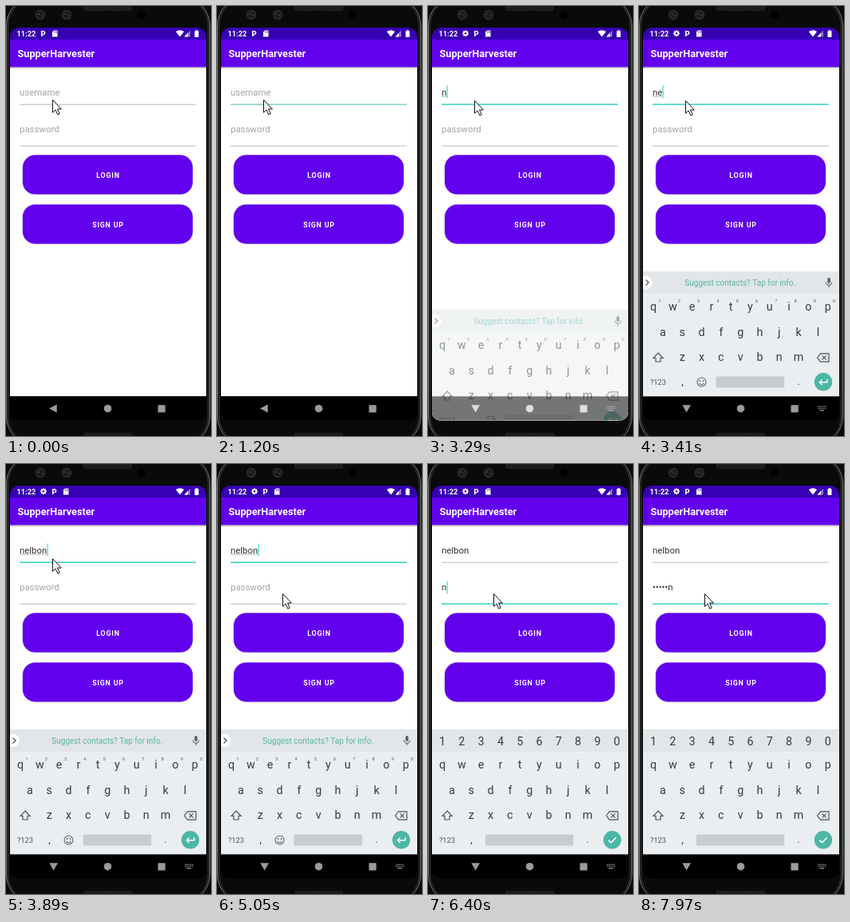
Write an HTML page with a canvas that moves like this. It is 257 by 538 pixels and loops after 8000 ms.

```html
<!DOCTYPE html>
<html lang="en">
<head>
<meta charset="utf-8">
<title>Login screen</title>
<style>
html, body { margin: 0; width: 100%; height: 100%; overflow: hidden; background: #0a0a0a; }
canvas { display: block; width: 257px; height: 538px; }
</style>
</head>
<body>
<canvas id="stage"></canvas>
<script>
const W = 257, H = 538, LOOP = 8000;
const TOOLBAR_END = 76.3, NAV_TOP = 488.4, SCREEN_END = 518.5;
const canvas = document.getElementById('stage');
const g = canvas.getContext('2d');
const dpr = window.devicePixelRatio || 1;
canvas.width = W * dpr;
canvas.height = H * dpr;

const PURPLE = '#6200ee', TEAL = '#40dccd', GREY = '#bababa', MINT = '#4db6a4', INK = '#343d42';
const NAME = 'nelbon';
const NAME_TIMES = [3040, 3410, 3530, 3650, 3770, 3890];
const PASS_TIMES = [6400, 6520, 6640, 6790, 7350, 7470];
const USER_CARET = [1320, 1740, 2250, 2780, 3040, 4420, 4930, 5170];
const PASS_CARET = [5290, 5780, 6280, 7970];

const passed = (times, t) => times.filter(x => t >= x).length;
const isOn = (toggles, t) => passed(toggles, t) % 2 === 1;
// Value of the last [time, value] pair reached.
const at = (steps, t) => steps.reduce((v, [time, next]) => t >= time ? next : v, steps[0][1]);

function rect(x, y, w, h, color) {
  g.fillStyle = color;
  g.fillRect(x, y, w, h);
}
function round(x, y, w, h, r, color) {
  g.beginPath();
  g.roundRect(x, y, w, h, r);
  g.fillStyle = color;
  g.fill();
}
function disc(x, y, r, color) {
  g.beginPath();
  g.arc(x, y, r, 0, Math.PI * 2);
  g.fillStyle = color;
  g.fill();
}
function trace(points, close) {
  g.beginPath();
  points.forEach(([x, y]) => g.lineTo(x, y));
  if (close) g.closePath();
}
function poly(points, color) {
  trace(points, true);
  g.fillStyle = color;
  g.fill();
}
function line(points, color, width = 1, close = false) {
  trace(points, close);
  g.strokeStyle = color;
  g.lineWidth = width;
  g.stroke();
}
function text(str, x, y, size, color, { weight = 400, align = 'left', spacing = 0 } = {}) {
  g.font = `${weight} ${size}px Roboto, sans-serif`;
  g.letterSpacing = spacing + 'px';
  g.textAlign = align;
  g.fillStyle = color;
  g.fillText(str, x, y);
  return g.measureText(str).width;
}

function drawRim(inset, color) {
  g.beginPath();
  g.roundRect(inset, inset - 13, 256 - 2 * inset, H + 26 - 2 * inset, 38 - inset);
  g.strokeStyle = color;
  g.lineWidth = 1;
  g.stroke();
}

function drawBezel() {
  rect(0, 0, W, H, '#0a0a0a');
  drawRim(0.5, '#808080');
  drawRim(2.5, '#3c3c3c');
  round(97, -4, 61, 10, 3, '#202020');
  round(97, 534, 61, 10, 3, '#202020');
  for (let x = 100; x < 157; x += 3) {
    rect(x, 1, 1, 4, '#121212');
    rect(x, 535, 1, 3, '#121212');
  }
  for (const x of [43, 76]) {
    disc(x, 11, 6.3, '#29292c');
    disc(x, 11, 4, '#19191c');
    disc(x - 1.5, 10, 1.1, '#4c4c52');
    disc(x + 2, 12, 1, '#3c3c42');
  }
  disc(170, 11, 5.3, '#000');
}

function drawGear(x, y) {
  for (let i = 0; i < 8; i++) {
    const a = i * Math.PI / 4;
    line([[x, y], [x + 4 * Math.cos(a), y + 4 * Math.sin(a)]], '#fff', 1.4);
  }
  disc(x, y, 3.1, '#fff');
  disc(x, y, 1.3, '#3700b3');
}

function drawStatus(t) {
  rect(5, 27, 246, 15, '#3700b3');
  text('11:22', 13.5, 38, 9.2, '#fff', { weight: 700 });
  const shift = at([[0, 0], [1470, 7], [1590, 12.5], [1740, 14]], t);
  if (shift) {
    g.globalAlpha = shift / 14;
    drawGear(47, 34.3);
    g.globalAlpha = 1;
  }
  text('P', 43.6 + shift, 38, 9.5, '#fff', { weight: 900 });
  const x = 58 + shift;
  poly([[x + 2, 30.5], [x + 6.5, 30.5], [x + 6.5, 38.5], [x, 38.5], [x, 32.5]], '#fff');
  for (const dx of [2.2, 3.7, 5.1]) rect(x + dx, 31.5, 0.7, 2, '#3700b3');

  g.beginPath();
  g.moveTo(218, 38.5);
  g.lineTo(212.8, 32);
  g.quadraticCurveTo(218, 28.3, 223.2, 32);
  g.fillStyle = '#fff';
  g.fill();
  poly([[231, 30.5], [231, 38.5], [223.5, 38.5]], 'rgba(255,255,255,.45)');
  poly([[228, 33.7], [228, 38.5], [223.5, 38.5]], '#fff');
  round(236.5, 31, 5, 8, 0.8, '#fff');
  rect(238, 30, 2, 1, '#fff');
}

function drawToolbar() {
  const shade = g.createLinearGradient(0, TOOLBAR_END, 0, TOOLBAR_END + 3);
  shade.addColorStop(0, '#b4b4b4');
  shade.addColorStop(1, '#fff');
  rect(5, 76, 246, 3.3, shade);
  rect(5, 42, 246, TOOLBAR_END - 42, PURPLE);
  text('SupperHarvester', 14.5, 64, 12.7, '#fff', { weight: 700 });
}

function drawField(value, hint, y, lineY, focus, caret, composing) {
  const width = value ? text(value, 17, y, 11.4, '#303030') : 0;
  if (!value) text(hint, 17, y, 11.4, '#a2a2a2');
  if (composing && value) rect(17, y + 1.2, width, 0.8, '#a0a0a0');
  rect(17, lineY, 221, 1, GREY);
  if (focus) {
    g.globalAlpha = focus;
    rect(17, lineY - 0.3, 221, 1.5, TEAL);
    g.globalAlpha = 1;
  }
  if (caret) rect(17.2 + width, y - 12, 1.2, 16, TEAL);
}

function drawButton(label, y, labelY) {
  round(20.4, y - 0.6, 214.2, 50.2, 16, '#cdc3ea');
  round(21, y, 213, 49, 15.5, PURPLE);
  text(label, 128, labelY, 8.9, '#fff', { weight: 700, align: 'center', spacing: 0.8 });
}

function drawFields(t) {
  const name = NAME.slice(0, passed(NAME_TIMES, t));
  const typed = passed(PASS_TIMES, t);
  const pass = typed ? '•'.repeat(typed - 1) + NAME[typed - 1] : '';
  const nameFocus = at([[0, 0], [1200, 0.5], [1320, 1], [5170, 0.4], [5290, 0]], t);
  const passFocus = at([[0, 0], [5170, 0.5], [5290, 1]], t);
  drawField(name, 'username', 111.5, 122.7, nameFocus, isOn(USER_CARET, t), t < 5170);
  drawField(pass, 'password', 158.3, 174.5, passFocus, isOn(PASS_CARET, t), false);
}

const keyX = i => 18 + i * 24.3;
function keyRow(chars, x, y) {
  [...chars].forEach((c, i) => text(c, x + i * 24.3, y, 14.3, INK, { align: 'center' }));
}

function drawStrip(t) {
  disc(8.5, 346, 8.3, '#fff');
  line([[8.5, 342.5], [12, 346], [8.5, 349.5]], '#4f575b', 1.3);
  if (t < 5410) {
    text('Suggest contacts? Tap for info.', 126.7, 350.2, 10, '#56b5a6', { align: 'center' });
  }
  round(236.3, 340, 3.6, 7, 1.8, '#596165');
  g.beginPath();
  g.arc(238.1, 345.6, 3.7, 0, Math.PI);
  g.strokeStyle = '#596165';
  g.lineWidth = 1.1;
  g.stroke();
  rect(237.5, 349, 1.2, 2.8, '#596165');
}

function drawShiftAndDelete() {
  line([[24, 434], [30, 440.3], [27, 440.3], [27, 445], [21, 445], [21, 440.3], [18, 440.3]], '#4b5459', 1.2, true);
  line([[223.5, 440], [227.5, 434.8], [238, 434.8], [238, 445.2], [227.5, 445.2]], '#4b5459', 1.2, true);
  line([[229.5, 437.4], [234.7, 442.6]], '#4b5459', 1.2);
  line([[234.7, 437.4], [229.5, 442.6]], '#4b5459', 1.2);
}

function drawSmile() {
  g.strokeStyle = '#5b6468';
  g.lineWidth = 1.1;
  g.beginPath();
  g.arc(78.5, 470.5, 5.5, 0, Math.PI * 2);
  g.stroke();
  disc(76.5, 469, 0.9, '#5b6468');
  disc(80.5, 469, 0.9, '#5b6468');
  g.beginPath();
  g.arc(78.5, 471, 2.8, 0.2, Math.PI - 0.2);
  g.stroke();
}

function drawKeyboard(t) {
  const digits = t >= 6030;
  rect(5, 332, 246, 157, '#eaeef0');
  rect(5, 332, 246, 28, '#e2e6e8');
  if (digits) keyRow('1234567890', 18, 351.8);
  else drawStrip(t);

  keyRow('qwertyuiop', 18, 381.3);
  if (!digits) {
    [...'1234567890'].forEach((c, i) =>
      text(c, keyX(i) + 8, 371, 5.8, '#555d61', { align: 'center' }));
  }
  keyRow('asdfghjkl', 30, 412.5);
  keyRow('zxcvbnm', 54.2, 444.2);
  drawShiftAndDelete();

  text('?123', 24, 474, 9.3, '#4b5459', { align: 'center' });
  text(',', 54.5, 474, 13, INK, { align: 'center' });
  text('.', 200, 474, 13, INK, { align: 'center' });
  if (!digits) drawSmile();
  const left = digits ? 72 : 96.5;
  round(left, 463.5, 182.3 - left, 14, 1.5, '#c7ccce');

  disc(231, 470.3, 11.2, MINT);
  if (digits) {
    line([[226.3, 470.6], [229.6, 473.8], [235.8, 467.2]], '#fff', 1.5);
  } else {
    line([[236, 467], [236, 470.7], [226.5, 470.7]], '#fff', 1.4);
    line([[229.7, 467.4], [226.4, 470.7], [229.7, 474]], '#fff', 1.4);
  }
}

function drawKeyboardIcon(color) {
  for (let i = 0; i < 5; i++) {
    rect(224.2 + i * 2.2, 500.5, 1.4, 1.4, color);
    rect(224.2 + i * 2.2, 502.8, 1.4, 1.4, color);
  }
  rect(226.4, 505.2, 5.8, 1.4, color);
}

function drawNav(t, rising) {
  rect(5, NAV_TOP, 246, SCREEN_END - NAV_TOP, rising ? 'rgba(0,0,0,.52)' : '#000');
  const color = rising ? '#dedede' : '#9b9b9b';
  if (t < 2500) {
    poly([[54, 503.6], [63.7, 498.5], [63.7, 508.7]], color);
  } else {
    poly([[54.3, 499.3], [65, 499.3], [59.6, 508.6]], color);
    drawKeyboardIcon(rising ? '#b0b0b0' : '#888');
  }
  disc(127.5, 503.7, 4.8, color);
  round(190.5, 499.2, 9.2, 9.2, 0.7, color);
}

function drawPointer(t) {
  const [x, y] = at([[0, [58, 117]], [1740, [58, 118]], [4670, [72, 143]], [4790, [82, 162]]], t);
  const shape = [[0.5, 0.5], [0.5, 16.3], [4, 12.9], [6.8, 19], [9.2, 17.9], [6.5, 12], [11.4, 12]]
    .map(([dx, dy]) => [x + dx, y + dy]);
  poly(shape, '#fff');
  line(shape, '#111', 1, true);
}

function draw(t) {
  const rising = t >= 3290 && t < 3410;
  g.setTransform(dpr, 0, 0, dpr, 0, 0);
  drawBezel();
  g.save();
  g.beginPath();
  g.roundRect(5, 27, 246, SCREEN_END - 27, [12, 12, 10, 10]);
  g.clip();
  rect(5, 76, 246, (rising ? SCREEN_END : NAV_TOP) - 76, '#fff');
  drawStatus(t);
  drawToolbar();
  drawFields(t);
  drawButton('LOGIN', 186.6, 214.6);
  drawButton('SIGN UP', 248.4, 276.6);

  if (t >= 3290) {
    g.save();
    if (rising) {
      g.translate(0, 48);
      drawKeyboard(t);
      // White veil stands for the half-faded keyboard.
      rect(5, 332, 246, 157, 'rgba(255,255,255,.45)');
    } else {
      drawKeyboard(t);
    }
    g.restore();
  }
  drawNav(t, rising);
  g.restore();
  drawPointer(t);
}

const start = performance.now();
function tick() {
  draw((performance.now() - start) % LOOP);
  requestAnimationFrame(tick);
}
tick();
</script>
</body>
</html>
```
